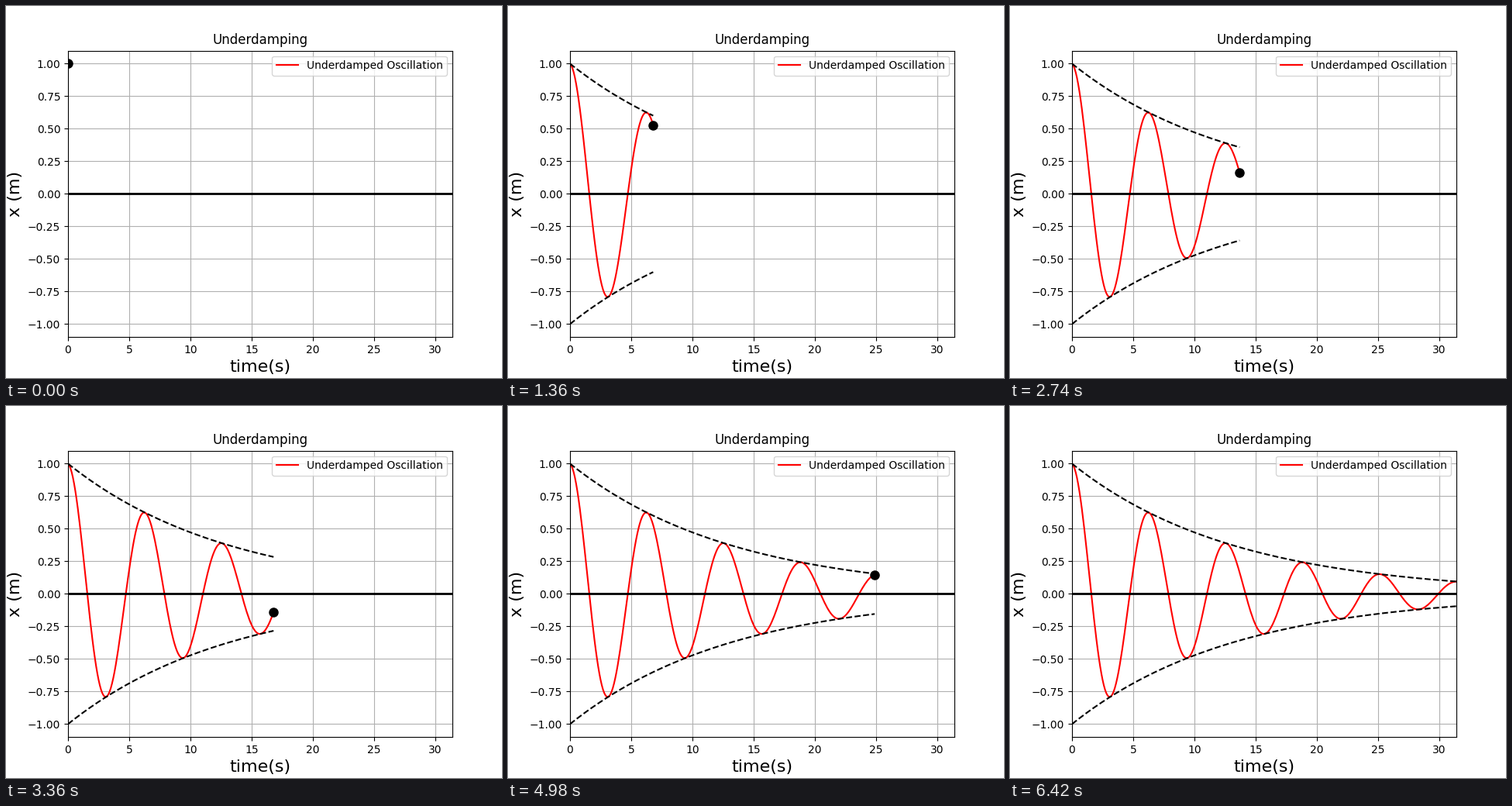
Write a matplotlib script that moves like this. It is 640 by 480 pixels and loops after 10 s.

```python
import matplotlib.pyplot as plt
import numpy as np
from matplotlib.animation import FuncAnimation

FRAMES, INTERVAL = 500, 20
STEP = 0.1
GAMMA = 0.075
OMEGA = np.sqrt(1 - GAMMA**2)

t = np.arange(FRAMES) * STEP
envelope = np.exp(-GAMMA * t)
x = envelope * np.cos(OMEGA * t)

fig, ax = plt.subplots(figsize=(6.4, 4.8), dpi=100)
ax.set_title("Underdamping")
ax.set_xlabel("time(s)", fontsize=16)
ax.set_ylabel("x (m)", fontsize=16)
ax.set_xlim(0, 10 * np.pi)
ax.set_ylim(-1.1, 1.1)
ax.grid(True)

curve, = ax.plot([], [], "r", label="Underdamped Oscillation")
upper, = ax.plot([], [], "k--")
lower, = ax.plot([], [], "k--")
ax.axhline(0, color="k", linewidth=2)
bob, = ax.plot([], [], "ko", markersize=8)
ax.legend(loc="upper right")


def update(i):
    n = i + 1
    curve.set_data(t[:n], x[:n])
    upper.set_data(t[:n], envelope[:n])
    lower.set_data(t[:n], -envelope[:n])
    bob.set_data([t[i]], [x[i]])
    return curve, upper, lower, bob


anim = FuncAnimation(fig, update, frames=FRAMES, interval=INTERVAL,
                     init_func=lambda: update(0), repeat=True, repeat_delay=0)
plt.show()
```
